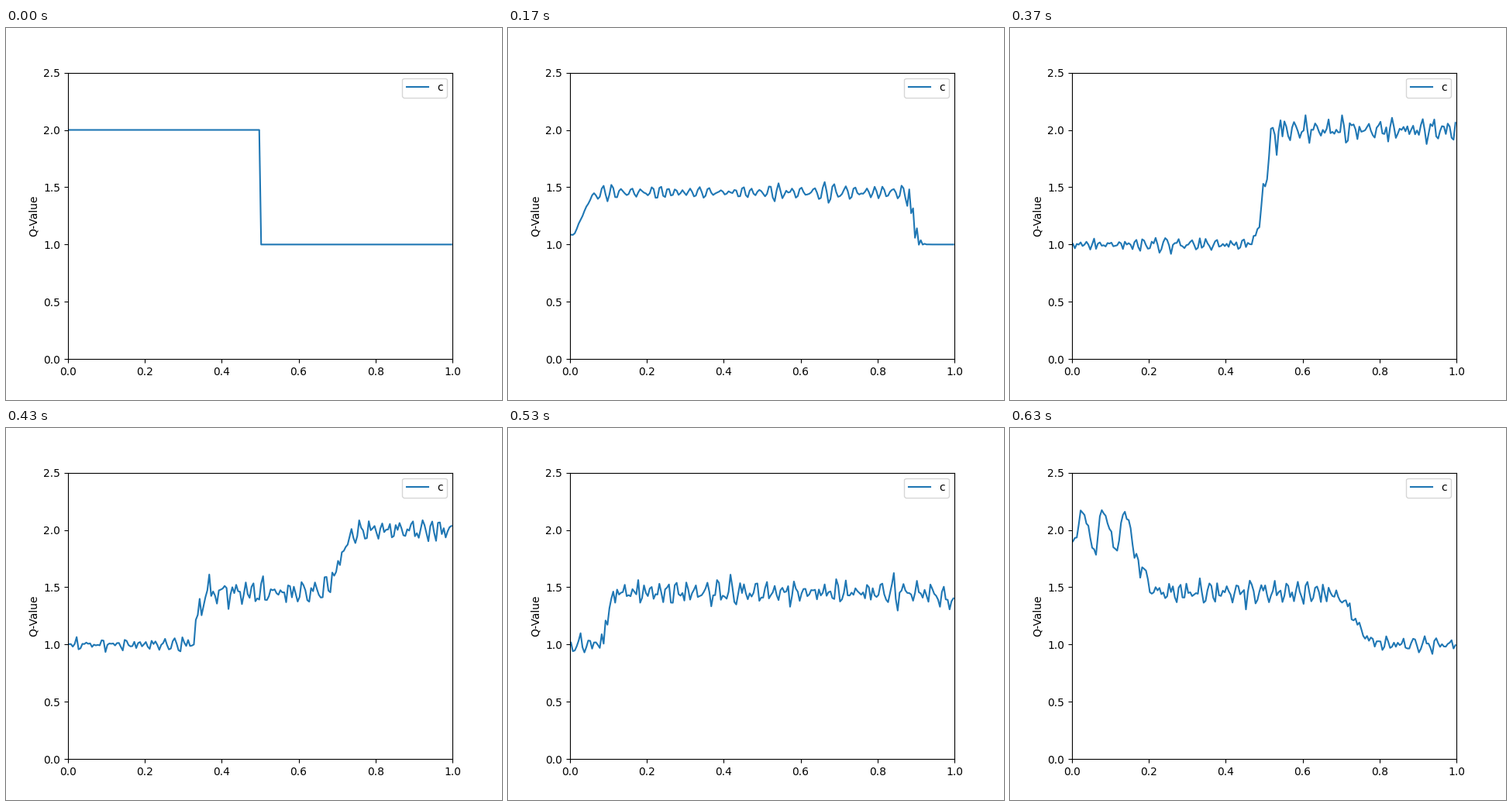
Animation of 640 by 480 pixels, one loop 660 ms. Source, as a matplotlib script:

```python
import matplotlib.pyplot as plt
import numpy as np
from matplotlib.animation import FuncAnimation

FRAMES, INTERVAL = 20, 33
CELLS = 200
LOW, MID, HIGH = 1.0, 1.455, 2.0
FLIP = 11  # frame at which the two sides have traded places

x = (np.arange(CELLS) + 0.5) / CELLS
zigzag = np.where(np.arange(CELLS) % 2, -1, 1)

# Front tracks: frames, unfolded positions and widths. A position past a wall
# means the front has been reflected there.
FIRST = dict(
    t=[0, 5, 8, 11],
    left=[0.5, -0.03, -0.255, -0.5], left_w=[2e-4, 0.025, 0.02, 0.018],
    right=[0.5, 0.893, 1.182, 1.5], right_w=[2e-4, 0.012, 0.014, 0.018],
)
SECOND = dict(
    t=[11, 14, 17, 19],
    left=[0.5, 0.257, 0.018, -0.178], left_w=[0.018, 0.007, 0.014, 0.02],
    right=[0.5, 0.81, 1.107, 1.265], right_w=[0.018, 0.035, 0.035, 0.035],
)


def step(pos, width):
    return 0.5 * (1 + np.tanh(pos / width))


def wobble(n, shortest, longest, count=11):
    """Grid-scale ripples of unit RMS, drifting from frame to frame."""
    rng = np.random.default_rng(7)
    total = np.zeros(CELLS)
    for cells in np.linspace(shortest, longest, count):
        phase, speed = rng.uniform(0, 2 * np.pi), rng.uniform(0.8, 3.5)
        total += np.sin(2 * np.pi * x * CELLS / cells + phase + speed * n)
    return total * np.sqrt(2 / count)


def profile(n):
    first = n < FLIP
    track = FIRST if first else SECOND
    sl, wl, sr, wr = (np.interp(n, track["t"], track[k])
                      for k in ("left", "left_w", "right", "right_w"))

    left_in, left_out = step(x - sl, wl), step(-x - sl, wl)
    right_in, right_out = step(x - sr, wr), step(x - 2 + sr, wr)
    if first:
        start, sign, a, b = HIGH, -1, HIGH - MID, MID - LOW
    else:
        start, sign, a, b = LOW, 1, MID - LOW, HIGH - MID
    q = start + sign * (a * left_in + b * left_out
                        + b * right_in - a * right_out)

    # Ripples fill the disturbed zone and are strongest behind the shock.
    # A longer swell forms where the shock has bounced off a wall.
    if first:
        low = np.interp(n, [5, 8], [0, 0.037])
        noise = np.interp(q, [LOW, MID, HIGH], [low, 0.032, 0.05])
        behind = left_in * (1 - right_in)
        noise = noise * behind
        shock, band, age = sr, (3.6, 6), n
        swell = np.interp(n, [6, 7, 8, 11], [0.1, 0.18, 0.15, 0])
        wall, bounced = 1 - x, right_out
    else:
        noise = np.interp(q, [LOW, MID, HIGH], [0.03, 0.055, 0.05])
        behind = left_in
        shock, band, age = sl, (2.3, 7), n - FLIP
        swell = np.interp(n, [17, 18, 19], [0.1, 0.18, 0.17])
        wall, bounced = x, left_out
    noise = noise * (1 + behind * np.exp(-np.abs(x - shock) / 0.06))
    noise = noise * (1 - 0.3 * bounced)

    # Cell-to-cell alternation on the shock face.
    face = 0.09 * min(1, age / 5) * np.exp(-((x - shock) / 0.016) ** 2)

    return (q + noise * wobble(n, *band) + face * zigzag
            - swell * bounced * np.cos(2 * np.pi * wall / 0.056))


fig, ax = plt.subplots(figsize=(6.4, 4.8), dpi=100)
line, = ax.plot(x, profile(0), label="c")
ax.set_xlim(0, 1)
ax.set_ylim(0, 2.5)
ax.set_ylabel("Q-Value")
ax.legend(loc="upper right")


def update(n):
    line.set_ydata(profile(n))
    return line,


anim = FuncAnimation(fig, update, frames=FRAMES, interval=INTERVAL,
                     repeat=True, repeat_delay=0)
plt.show()
```
